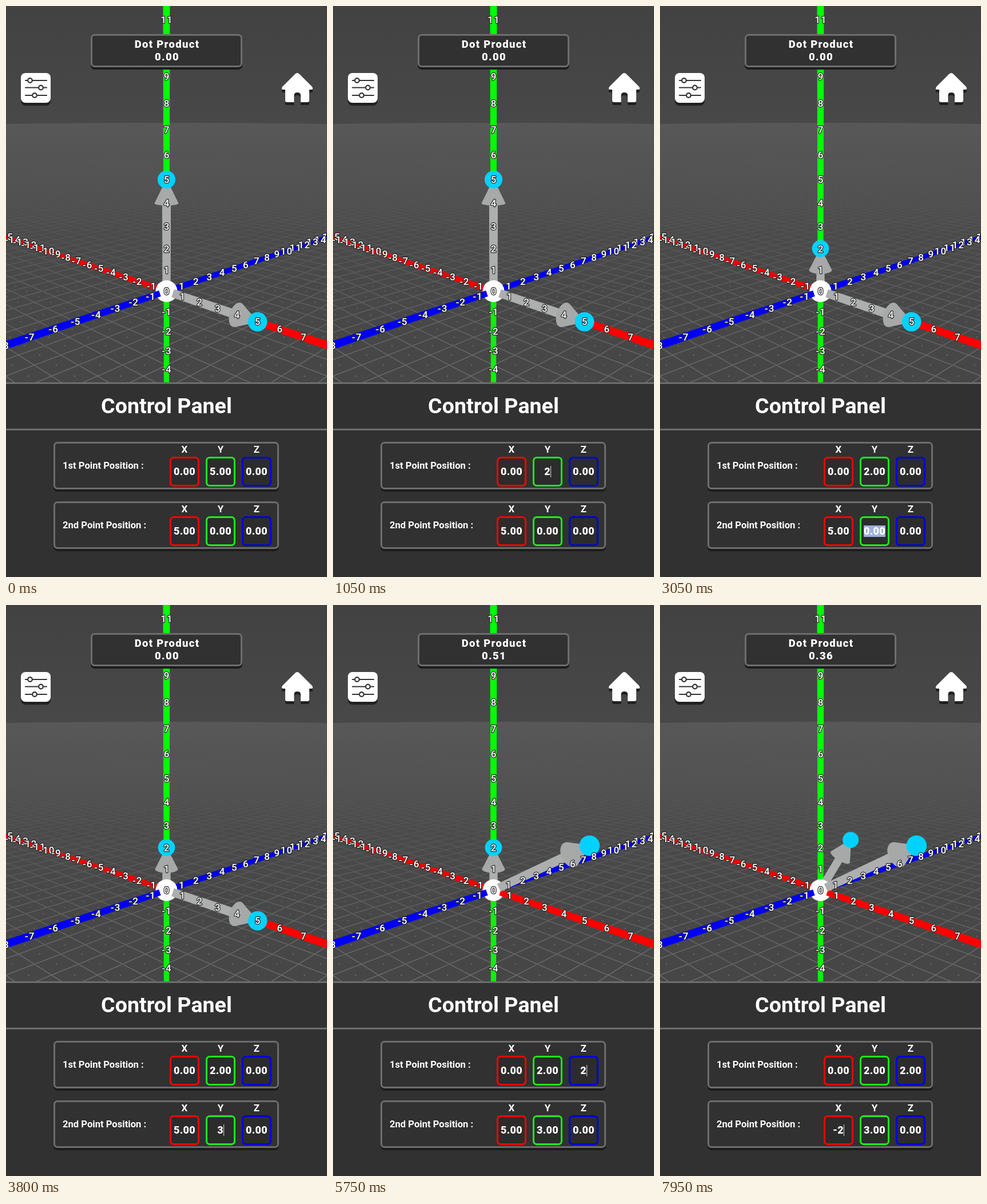
Write an HTML page with a canvas that moves like this. It is 561x997 px and loops after 8000 ms.

```html
<!DOCTYPE html>
<html lang="en">
<head>
<meta charset="utf-8">
<title>Dot Product</title>
<style>
  html, body { margin: 0; width: 100%; height: 100%; overflow: hidden; background: #313131; }
  #stage { position: relative; width: 561px; height: 997px; overflow: hidden; font-family: Roboto, sans-serif; color: #fff; }
  #stage * { box-sizing: border-box; position: absolute; white-space: nowrap; }
  canvas, svg { left: 0; top: 0; }
  .card { background: #313131; border: 3px solid #6d6d6d; border-radius: 7px; box-shadow: 0 4px 0 #1c1c1c; }
  #result { left: 148px; top: 49px; width: 265px; height: 58px; }
  #result div { width: 100%; left: 1px; text-align: center; font: 900 18.5px/22px Roboto, sans-serif; letter-spacing: 1.3px; }
  #panel { left: 0; top: 657px; width: 561px; height: 340px; background: #313131; border-top: 3px solid #6d6d6d; }
  #panel h1 { margin: 0; left: 0; top: 0; width: 561px; height: 81px; font: 700 37.6px/77px Roboto, sans-serif; text-align: center; border-bottom: 3px solid #6d6d6d; }
  .point { left: 83px; width: 394px; height: 83px; }
  .name { left: 13px; top: 27px; font: 700 16.6px/24px Roboto, sans-serif; }
  .axis { top: 0; width: 52px; text-align: center; font: 700 17px/20px Roboto, sans-serif; }
  .field { top: 23px; width: 52px; height: 52px; border: 3px solid; border-radius: 7px; background: #2c2c2c; }
  .value { left: 50%; top: 50%; transform: translate(-50%, -50%); color: #fff; font: 900 18px/20px Roboto, sans-serif; letter-spacing: .3px; }
  .selected { background: #9db2dc; }
  .typing { border-right: 1px solid #ddd; }
</style>
</head>
<body>
<div id="stage">
  <canvas id="scene" width="561" height="660"></canvas>
  <svg width="561" height="200" viewBox="0 0 561 200">
    <defs>
      <path id="house" d="M509 117 Q511 117 513 119 L535 141 Q538 146 533 146 H530 V165 Q530 168 527 168 H515 V156 Q515 151 509 151 Q503.500 151 503.500 156 V168 H491 Q488 168 488 165 V146 H485 Q480 146 483 141 L505 119 Q507 117 509 117Z"/>
    </defs>
    <rect x="26" y="122" width="52" height="52" rx="8" fill="#202020"/>
    <rect x="26" y="117" width="52" height="52" rx="8" fill="#fff"/>
    <g fill="#fff" stroke="#333" stroke-width="2.2" stroke-linecap="round">
      <path d="M34 130H71M34 142.500H71M34 156H71"/>
      <circle cx="42" cy="130" r="3.800"/><circle cx="61" cy="142.500" r="3.800"/><circle cx="50" cy="156" r="3.800"/>
    </g>
    <use href="#house" y="5" fill="#202020"/>
    <use href="#house" fill="#fff"/>
  </svg>
  <div id="result" class="card"><div style="top:4px">Dot Product</div><div id="dot" style="top:26px">0.00</div></div>
  <div id="panel"><h1>Control Panel</h1></div>
</div>
<script>
const LOOP = 8000;
const INITIAL = [[0, 5, 0], [5, 0, 0]];
// Each edit: field selected, text typed, value committed.
const EDITS = [
  { point: 0, axis: 1, select: 250, keys: [[750, '2']], commit: 1200, value: 2 },
  { point: 1, axis: 1, select: 2900, keys: [[3450, '3']], commit: 3900, value: 3 },
  { point: 0, axis: 2, select: 5150, keys: [[5600, '2']], commit: 6050, value: 2 },
  { point: 1, axis: 0, select: 7150, keys: [[7600, '-'], [7850, '-2']], commit: LOOP, value: -2 }
];

const panel = document.getElementById('panel');
const dotText = document.getElementById('dot');
const ctx = document.getElementById('scene').getContext('2d');

function add(parent, className, text = '') {
  const el = document.createElement('div');
  el.className = className;
  el.textContent = text;
  parent.append(el);
  return el;
}

const fields = ['1st', '2nd'].map((ordinal, row) => {
  const card = add(panel, 'card point');
  card.style.top = 101 + row * 104 + 'px';
  add(card, 'name', ordinal + ' Point Position :');
  return ['#f00', '#1bf01b', '#00d'].map((color, i) => {
    const left = 200 + i * 63 + 'px';
    add(card, 'axis', 'XYZ'[i]).style.left = left;
    const box = add(card, 'field');
    box.style.left = left;
    box.style.borderColor = color;
    return add(box, 'value');
  });
});

// World to screen; w is the relative depth.
function project([x, y, z]) {
  const w = 1 + 0.0295 * (z - x) - 0.0147 * y;
  return { x: 280.5 + 27.13 * (x + z) / w, y: 498 + (9.1 * (x - z) - 36.13 * y) / w, w };
}
const scale = (v, k) => v.map(c => c * k);
const sum = (...vs) => [0, 1, 2].map(i => vs.reduce((s, v) => s + v[i], 0));
const cross = (a, b) => [a[1] * b[2] - a[2] * b[1], a[2] * b[0] - a[0] * b[2], a[0] * b[1] - a[1] * b[0]];
const dot = (a, b) => a[0] * b[0] + a[1] * b[1] + a[2] * b[2];
const unit = v => scale(v, 1 / Math.hypot(...v));

function polygon(points, color, edge) {
  ctx.beginPath();
  points.forEach(p => ctx.lineTo(p.x, p.y));
  ctx.closePath();
  ctx.fillStyle = ctx.strokeStyle = color;
  ctx.lineWidth = 0.6;
  ctx.fill();
  if (edge) ctx.stroke();
}

function disc(p, radius, color) {
  ctx.beginPath();
  ctx.arc(p.x, p.y, radius, 0, 7);
  ctx.fillStyle = color;
  ctx.fill();
}

function beam(from, to, radius, color) {
  const a = project(from), b = project(to);
  const length = Math.hypot(b.x - a.x, b.y - a.y);
  const nx = (a.y - b.y) / length, ny = (b.x - a.x) / length;
  const side = (p, sign) => {
    const r = sign * radius * 38.4 / p.w;
    return { x: p.x + nx * r, y: p.y + ny * r };
  };
  polygon([side(a, 1), side(b, 1), side(b, -1), side(a, -1)], color);
}

function arrow(tip) {
  const dir = unit(tip);
  const u = unit(cross(dir, Math.abs(dir[1]) > 0.9 ? [1, 0, 0] : [0, 1, 0]));
  const v = cross(dir, u);
  const base = sum(tip, scale(dir, -1));
  const rim = Array.from({ length: 32 }, (_, i) => {
    const a = i * Math.PI / 16;
    return project(sum(base, scale(u, Math.cos(a) / 2), scale(v, Math.sin(a) / 2)));
  });
  beam(scale(dir, 0.4), base, 0.185, '#adafaf');
  polygon(rim, '#a7a9a9');
  rim.forEach((p, i) => polygon([project(tip), p, rim[(i + 1) % 32]], '#a7a9a9', true));
}

function gradient(top, bottom, stops) {
  const g = ctx.createLinearGradient(0, top, 0, bottom);
  stops.forEach(([at, color]) => g.addColorStop(at, color));
  return g;
}

function drawGround() {
  ctx.fillStyle = gradient(0, 205, [[0, '#424242'], [1, '#484848']]);
  ctx.fillRect(0, 0, 561, 660);
  ctx.save();
  ctx.beginPath();
  ctx.moveTo(0, 206);
  ctx.quadraticCurveTo(280, 202, 561, 206);
  ctx.lineTo(561, 660);
  ctx.lineTo(0, 660);
  ctx.clip();
  ctx.fillStyle = gradient(204, 660, [[0, '#585858'], [0.3, '#505050'], [0.6, '#484848'], [1, '#464646']]);
  ctx.fillRect(0, 200, 561, 460);
  ctx.beginPath();
  for (let k = -45; k <= 45; k++) {
    for (const [from, to] of [[[-60, 0, k], [k + 20, 0, k]], [[k, 0, k - 20], [k, 0, 60]]]) {
      const a = project(from), b = project(to);
      ctx.moveTo(a.x, a.y);
      ctx.lineTo(b.x, b.y);
    }
  }
  ctx.strokeStyle = '#727272';
  ctx.lineWidth = 1.4;
  ctx.stroke();
  for (let x = -10; x < 16; x++)
    for (let z = -16; z < 10; z++)
      if (x - z > -2 && x - z < 14) disc(project([x + 0.5, 0, z + 0.5]), 1.2, '#707070');
  ctx.fillStyle = gradient(204, 660, [[0, '#585858'], [0.2, '#525252f0'], [0.42, '#4a4a4ac8'], [0.65, '#48484878'], [1, '#46464618']]);
  ctx.fillRect(0, 200, 561, 460);
  ctx.restore();
}

function drawLabels() {
  ctx.font = '500 17px Roboto, sans-serif';
  ctx.textAlign = 'center';
  ctx.textBaseline = 'alphabetic';
  ctx.lineJoin = 'round';
  ctx.lineWidth = 2.4;
  ctx.strokeStyle = '#262626';
  ctx.fillStyle = '#fff';
  ctx.letterSpacing = '1px';
  const label = (n, axis) => {
    const at = [0, 0, 0];
    at[axis] = n;
    const p = project(at);
    ctx.strokeText(n, p.x + 0.5, p.y + 6);
    ctx.fillText(n, p.x + 0.5, p.y + 6);
  };
  for (let n = -15; n <= 7; n++) if (n) label(n, 0);
  for (let n = 15; n >= -8; n--) if (n) label(n, 2);
  for (let n = -4; n <= 11; n++) label(n, 1);
}

function drawScene([first, second]) {
  drawGround();
  const r = 0.14, upright = 0.13;
  beam([-17, 0, 0], [0, 0, 0], r, '#f50000');
  beam([0, 0, 17], [0, 0, 0], r, '#0000f0');
  beam([0, -6, 0], [0, 0, 0], upright, '#0cf00c');
  beam([0, 0, 0], [0, 13, 0], upright, '#00ff00');
  arrow(first);
  disc(project([0, 0, 0]), 19, '#fff');
  beam([0.42, 0, 0], [10, 0, 0], r, '#ff0000');
  beam([0, 0, -0.42], [0, 0, -10], r, '#0000f5');
  arrow(second);
  for (const tip of [first, second]) {
    const p = project(tip);
    disc(p, 14.4 / p.w, '#00d2ff');
  }
  drawLabels();
}

function stateAt(t) {
  const points = INITIAL.map(p => [...p]);
  let active = null;
  for (const edit of EDITS) {
    if (t >= edit.commit) points[edit.point][edit.axis] = edit.value;
    else if (t >= edit.select) active = edit;
  }
  return { points, active };
}

let shown = '';
function render(now) {
  const t = now % LOOP;
  const { points, active } = stateAt(t);
  const typed = active && active.keys.filter(([at]) => t >= at).pop();
  fields.forEach((row, p) => row.forEach((el, a) => {
    const here = active && active.point === p && active.axis === a;
    el.textContent = here && typed ? typed[1] : points[p][a].toFixed(2);
    el.classList.toggle('selected', !!here && !typed);
    el.classList.toggle('typing', !!here && !!typed);
  }));
  const key = points.join();
  if (key !== shown) {
    shown = key;
    drawScene(points);
    dotText.textContent = dot(unit(points[0]), unit(points[1])).toFixed(2);
  }
  requestAnimationFrame(() => render(performance.now() - start));
}
const start = performance.now();
render(0);
</script>
</body>
</html>
```
